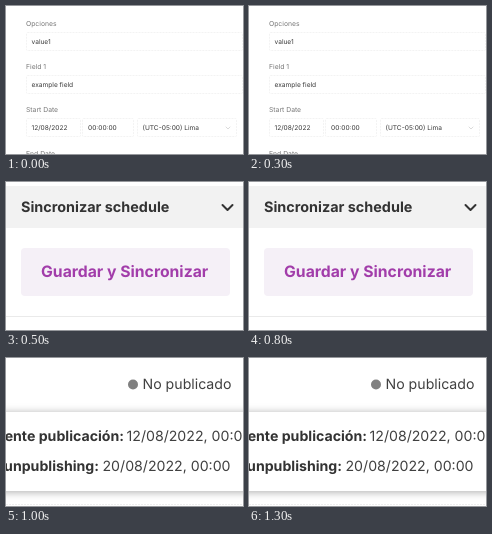
Write an HTML page that moves like this. It is 237 px wide and 148 px high and loops after 1.5 s.

```html
<!DOCTYPE html>
<html lang="es">
<meta charset="utf-8">
<title>Formulario</title>
<style>
  html, body { margin: 0; height: 100%; overflow: hidden; background: #fff; }
  svg { display: block; width: 237px; height: 148px; font-family: Inter, "Open Sans", sans-serif; text-rendering: geometricPrecision; }
  .scene { visibility: hidden; }
  .label { font-size: 6.8px; fill: #777; }
  .value { font-size: 6.6px; fill: #3a3a3a; }
  .field { fill: #fff; stroke: #f0f0f0; stroke-width: .8; stroke-dasharray: 2 1; }
  .strong { font-weight: 700; fill: #333; }
  .chevron { fill: none; stroke-linecap: round; stroke-linejoin: round; }
  .status { font-size: 14.15px; fill: #404040; }
  .card { filter: drop-shadow(0 1px 4px #0005); }
</style>
<svg viewBox="0 0 237 148">
  <g class="scene">
    <g class="field">
      <rect x="20.5" y="26.5" width="216" height="18" rx="1"/>
      <rect x="20.5" y="69.5" width="216" height="18" rx="1"/>
      <rect x="20.5" y="112.5" width="54" height="18" rx="1"/>
      <rect x="76.5" y="112.5" width="51" height="18" rx="1"/>
      <rect x="131.5" y="112.5" width="99" height="18" rx="1"/>
    </g>
    <g class="label">
      <text x="20" y="20">Opciones</text>
      <text x="20" y="63">Field 1</text>
      <text x="20" y="106">Start Date</text>
      <text x="20" y="149.5">End Date</text>
    </g>
    <g class="value">
      <text x="25.5" y="38">value1</text>
      <text x="25.5" y="80.5">example field</text>
      <text x="25.5" y="124">12/08/2022</text>
      <text x="82" y="124">00:00:00</text>
      <text x="136.5" y="124">(UTC-05:00) Lima</text>
    </g>
    <path class="chevron" stroke="#ccc" stroke-width=".7" d="M220 121l2 2 2-2"/>
  </g>

  <g class="scene">
    <rect y="4" width="237" height="42" fill="#f2f2f2"/>
    <path d="M0 134.5H237" stroke="#eaeaea"/>
    <text class="strong" x="15" y="30" font-size="14.4">Sincronizar schedule</text>
    <path class="chevron" stroke="#333" stroke-width="2" d="M216.5 23l5 5 5-5"/>
    <rect x="15" y="66" width="209" height="48" rx="4" fill="#f5f0f7"/>
    <text class="strong" x="35" y="95" font-size="15.75" style="fill:#a23daa">Guardar y Sincronizar</text>
  </g>

  <g class="scene status">
    <circle cx="127" cy="26.5" r="5" fill="#808080"/>
    <text x="136.5" y="31">No publicado</text>
    <path d="M0 146.5H237" stroke="#eee" stroke-dasharray="2 1"/>
    <rect class="card" x="-10" y="54" width="257" height="79" fill="#fff"/>
    <text class="strong" x="118" y="83" text-anchor="end">ente publicación:</text>
    <text x="120.5" y="83">12/08/2022, 00:00</text>
    <text class="strong" x="93" y="113" text-anchor="end">unpublishing:</text>
    <text x="96.5" y="113">20/08/2022, 00:00</text>
  </g>
</svg>
<script>
  const SCENE_MS = 500;
  const scenes = [...document.querySelectorAll('.scene')];
  const start = performance.now();

  function draw() {
    const elapsed = Math.max(0, performance.now() - start);
    const current = Math.floor(elapsed / SCENE_MS) % scenes.length;
    scenes.forEach((scene, i) => scene.style.visibility = i === current ? 'visible' : 'hidden');
    requestAnimationFrame(draw);
  }
  draw();
</script>
</html>
```
